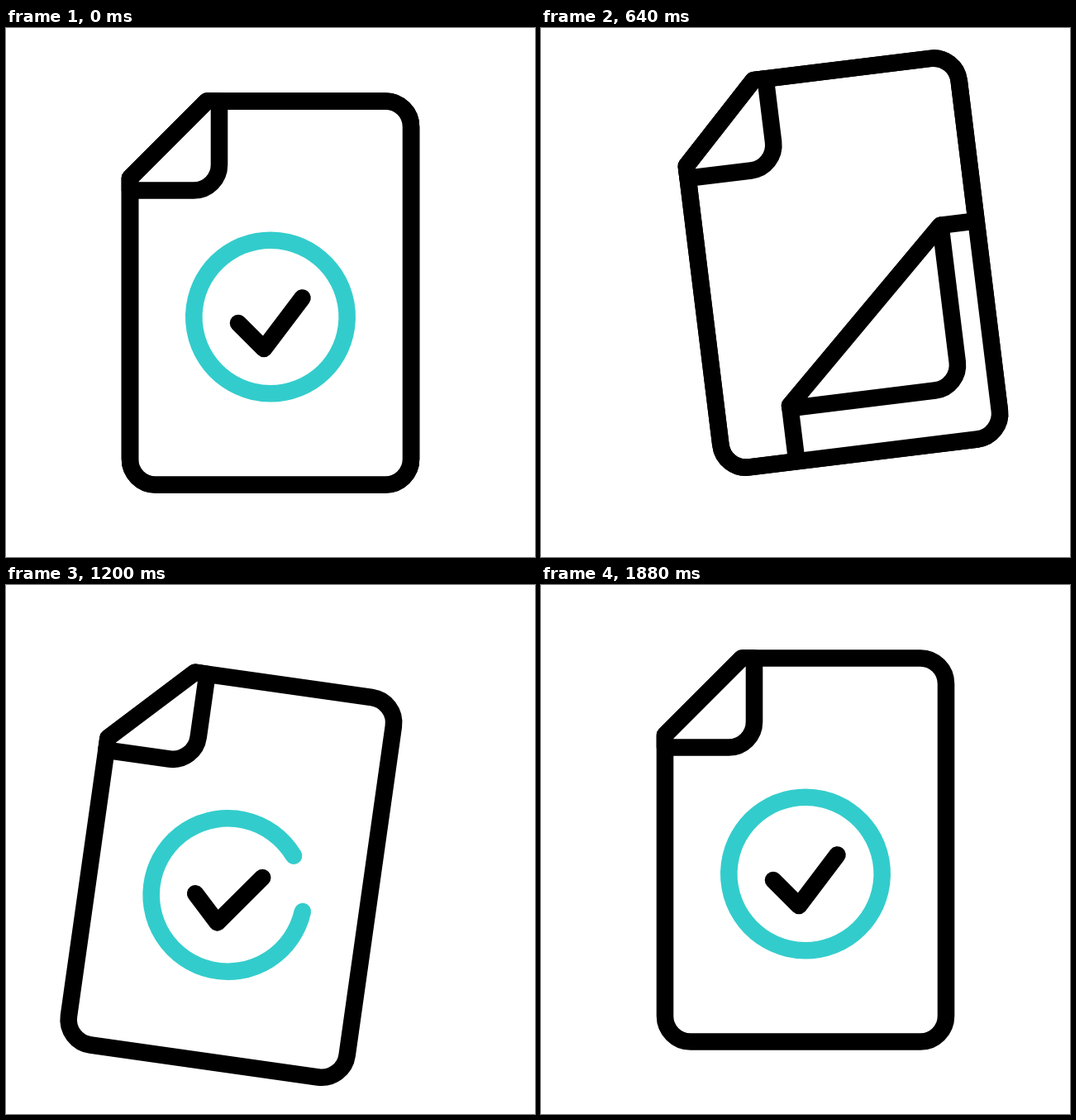
An HTML page with a canvas that plays this animation: 640x640 px, repeating every 2000 ms.

```html
<!DOCTYPE html>
<html>
<head>
<meta charset="utf-8">
<style>
  html, body { margin: 0; height: 100%; overflow: hidden; background: #fff; }
  canvas { display: block; }
</style>
</head>
<body>
<canvas id="stage" width="640" height="640"></canvas>
<script>
const ctx = document.getElementById('stage').getContext('2d');
const LOOP = 2000, STEP = 40, SWAP = 800;
const BLACK = '#000', TEAL = '#33cccc';
const CX = 320, CY = 349.5, RADIUS = 92.7;

const clamp = v => Math.min(1, Math.max(0, v));
const progress = (t, from, to) => clamp((t - from) / (to - from));

// cubic-bezier(.46, 0, .33, 1)
function ease(x) {
  let lo = 0, hi = 1;
  for (let i = 0; i < 24; i++) {
    const s = (lo + hi) / 2, r = 1 - s;
    if (1.38 * r * r * s + 0.99 * r * s * s + s * s * s < x) lo = s; else hi = s;
  }
  return lo * lo * (3 - 2 * lo);
}

const page = new Path2D(
  'M243 88.5H459a31 31 0 0 1 31 31V521.5a31 31 0 0 1-31 31H181a31 31 0 0 1-31-31V181.5Z');
const tick = new Path2D('M281 357L312 388L358.5 326.5');
const disc = new Path2D();
disc.arc(CX, CY, RADIUS, 0, 2 * Math.PI);

// Outline and folded corner of a sheet peeled by q
function sheet(q) {
  const left = 150 + 108 * q, top = 88.5 + 261 * q ** 1.32;
  const foldX = 243 + 247 * q, foldY = 181.5 + 368 * q;
  const flapX = 258 + 229 * q, flapY = 196.5 + 354 * q;
  const outline = new Path2D(`M${foldX} ${top}H999V999H${left}V${foldY}Z`);
  const flap = new Path2D(`M${foldX} ${top}H${flapX}V${flapY - 31}` +
    `a31 31 0 0 1-31 31H${left}V${foldY}Z`);
  return { outline, flap };
}

function stroke(path, color = BLACK) {
  ctx.strokeStyle = color;
  ctx.stroke(path);
}

function paint(path) {
  ctx.fill(path);
  stroke(path);
}

function badge(t) {
  const entering = t >= SWAP;
  const drop = entering ? 150 * (1 - progress(t, SWAP, 1274)) ** 2 : 0;
  ctx.save();
  ctx.clip(disc);
  ctx.translate(0, -drop);
  stroke(tick);
  ctx.restore();

  const sweep = entering ? Math.sin(progress(t, 807, 1381) * Math.PI / 2) : 1;
  if (sweep <= 0) return;
  const start = (254 * sweep - 219) * Math.PI / 180;
  const ring = new Path2D();
  ring.arc(CX, CY, RADIUS, start, start + sweep * 2 * Math.PI);
  stroke(ring, TEAL);
}

function draw(t) {
  const angle = -7.08 * ease(progress(t, 200, 690))
    + 15.13 * ease(progress(t, 720, 1215))
    - 8.05 * ease(progress(t, 1255, 1860));

  ctx.setTransform(1, 0, 0, 1, 0, 0);
  ctx.fillStyle = '#fff';
  ctx.fillRect(0, 0, 640, 640);
  ctx.lineWidth = 20.6;
  ctx.lineCap = ctx.lineJoin = 'round';
  ctx.translate(320 - 5.92 * angle, 320.5 + 4.26 * angle - 0.131 * angle * angle);
  ctx.rotate(angle * Math.PI / 180);
  ctx.translate(-320, -320.5);

  paint(page);
  paint(sheet(0).flap);
  if (t < SWAP) {
    const front = sheet(0.823 * (Math.max(0, t - 200) / 440) ** 2.5);
    ctx.save();
    ctx.clip(page);
    paint(front.outline);
    ctx.save();
    ctx.clip(front.outline);
    badge(t);
    ctx.restore();
    paint(front.flap);
    ctx.restore();
    stroke(page);
  } else {
    badge(t);
  }
}

function loop() {
  draw(Math.floor(performance.now() % LOOP / STEP) * STEP);
  requestAnimationFrame(loop);
}
loop();
</script>
</body>
</html>
```
